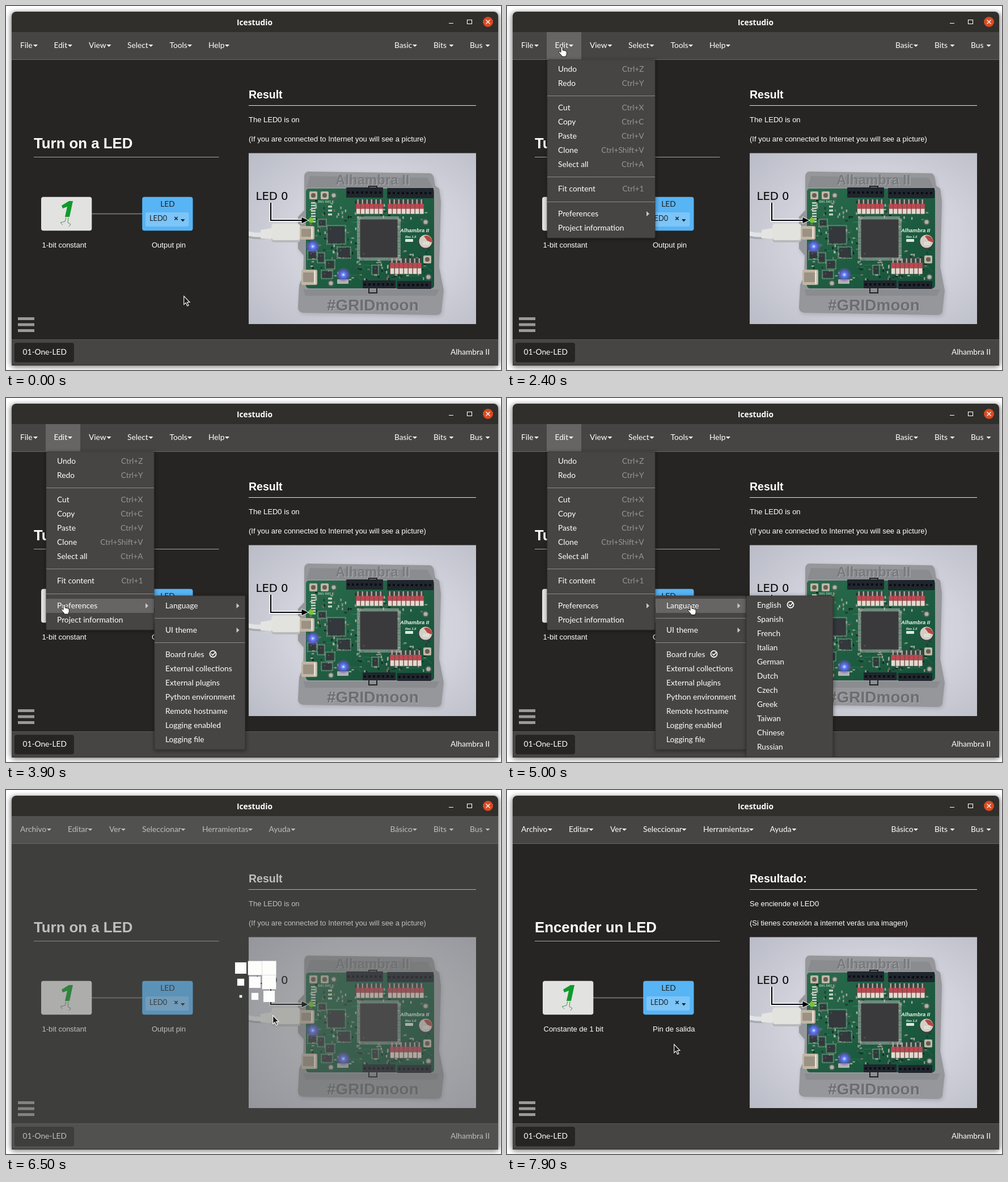
Animation, 873 px wide and 642 px high, one loop 8000 ms. Source, as an HTML page:

```html
<!DOCTYPE html>
<html lang="en">
<head>
<meta charset="utf-8">
<title>Icestudio language menu</title>
<style>
html, body { margin: 0; width: 100%; height: 100%; overflow: hidden; background: #fff; }
svg { display: block; width: 100%; height: 100%; }
text { white-space: pre; }
.ui { font: 13.75px Lato, sans-serif; fill: #fff; }
.doc { font: 13px "Liberation Sans", Arial, sans-serif; fill: #fff; }
.h1 { font-size: 25.8px; font-weight: bold; }
.h2 { font-size: 19.5px; font-weight: bold; }
.key { fill: #979593; }
</style>
</head>
<body>
<svg id="stage" viewBox="0 0 873 642" xmlns="http://www.w3.org/2000/svg">
  <defs>
    <radialGradient id="wall" cx=".55" cy=".5" r=".75">
      <stop offset="0" stop-color="#dadbe3"/><stop offset=".5" stop-color="#d1d2db"/>
      <stop offset="1" stop-color="#b9bbc6"/>
    </radialGradient>
    <linearGradient id="board" x1="0" y1="0" x2="1" y2="1">
      <stop offset="0" stop-color="#2a6b4c"/><stop offset="1" stop-color="#145038"/>
    </linearGradient>
    <linearGradient id="bar" x1="0" y1="0" x2="0" y2="1">
      <stop offset="0" stop-color="#302f2c"/><stop offset="1" stop-color="#282724"/>
    </linearGradient>
    <radialGradient id="glow">
      <stop offset="0" stop-color="#e8f4ff"/><stop offset=".25" stop-color="#5a86ff"/>
      <stop offset=".6" stop-color="#6a55d8" stop-opacity=".75"/><stop offset="1" stop-color="#6a55d8" stop-opacity="0"/>
    </radialGradient>
    <filter id="soft" x="-5%" y="-5%" width="110%" height="110%"><feGaussianBlur stdDeviation="5"/></filter>
    <filter id="shade" x="-10%" y="-10%" width="120%" height="120%"><feGaussianBlur stdDeviation="3"/></filter>
    <clipPath id="win"><rect x="10" y="46" width="858" height="587"/></clipPath>
    <clipPath id="photoBox"><rect x="428" y="259.5" width="401" height="301.5"/></clipPath>
  </defs>
</svg>
<script>
const svg = document.getElementById('stage');

function el(tag, attrs, parent = svg, txt) {
  const e = document.createElementNS('http://www.w3.org/2000/svg', tag);
  for (const k in attrs) e.setAttribute(k, attrs[k]);
  if (txt !== undefined) e.textContent = txt;
  parent.appendChild(e);
  return e;
}
const group = (parent = svg, attrs = {}) => el('g', attrs, parent);
const box = (g, x, y, w, h, fill, rx = 0, more = {}) => el('rect', { x, y, width: w, height: h, fill, rx, ...more }, g);
const disc = (g, cx, cy, r, fill, more = {}) => el('circle', { cx, cy, r, fill, ...more }, g);
const path = (g, d, more) => el('path', { d, fill: 'none', ...more }, g);
const label = (g, x, y, s, cls = 'ui', more = {}) => el('text', { x, y, class: cls, ...more }, g, s);
const show = (e, on) => e.setAttribute('visibility', on ? 'visible' : 'hidden');

// window
box(svg, 8, 11, 862, 626, '#000', 8, { opacity: .5, filter: 'url(#soft)' });
path(svg, 'M10 634V18a8 8 0 0 1 8-8H860a8 8 0 0 1 8 8V634z', { fill: 'url(#bar)' });
label(svg, 438.5, 33.5, 'Icestudio', '', {
  'text-anchor': 'middle', fill: '#fff', style: 'font:bold 13.8px "Open Sans","Noto Sans",sans-serif'
});
path(svg, 'M781 30.5H789M813.5 24.5H821.5V31.5H813.5z', { stroke: '#fff', 'stroke-width': 1.1 });
disc(svg, 850, 28, 9, '#dc4a20');
path(svg, 'M846.5 24.5L853.5 31.5M853.5 24.5L846.5 31.5', { stroke: '#fff', 'stroke-width': 1.4 });
box(svg, 10, 46, 858, 48, '#464543');
box(svg, 10, 94, 858, 1, '#676664');
box(svg, 10, 95, 858, 493, '#262523');
box(svg, 10, 588, 858, 1, '#5c5b59');
box(svg, 10, 589, 858, 44, '#464543');
box(svg, 15, 594, 105, 34.5, '#262523', 4);
label(svg, 29.5, 615, '01-One-LED');
label(svg, 853, 615, 'Alhambra II', 'ui', { 'text-anchor': 'end' });
for (const y of [549, 559.5, 570]) box(svg, 21, y, 29, 5, '#9b9a98');

// menu bar
const editTab = box(svg, 70, 46, 61, 48, '#666563');
function menuBar(items) {
  const g = group();
  for (const [x, s, c] of items) {
    label(g, x, 74, s);
    path(g, `M${c} 68h8l-4 4z`, { fill: '#fff' });
  }
  return g;
}
const shared = [[754, 'Bits', 781.5], [818, 'Bus', 845.5]];
const barEn = menuBar([[25, 'File', 48], [84.5, 'Edit', 109], [146, 'View', 177.5], [214, 'Select', 251.5],
  [288.5, 'Tools', 320], [357, 'Help', 386], [685, 'Basic', 717], ...shared]);
const barEs = menuBar([[25, 'Archivo', 72], [109, 'Editar', 144.5], [182, 'Ver', 203], [240, 'Seleccionar', 308.5],
  [346, 'Herramientas', 427], [463.5, 'Ayuda', 502.5], [677.5, 'Básico', 717], ...shared]);

// document
box(svg, 428, 175, 401, 1, '#e4e4e2');
box(svg, 49, 266, 326.5, 1, '#a5a4a2');
function docText(h1, h2, a, b, left, right, dx) {
  const g = group();
  label(g, 49, 251, h1, 'doc h1');
  label(g, 428, 163, h2, 'doc h2');
  label(g, 428, 204.5, a, 'doc');
  label(g, 428, 239, b, 'doc');
  label(g, 63.5 + dx, 426, left, 'doc');
  label(g, 257, 426, right, 'doc');
  return g;
}
const docEn = docText('Turn on a LED', 'Result', 'The LED0 is on',
  '(If you are connected to Internet you will see a picture)', '1-bit constant', 'Output pin', 0);
const docEs = docText('Encender un LED', 'Resultado:', 'Se enciende el LED0',
  '(Si tienes conexión a internet verás una imagen)', 'Constante de 1 bit', 'Pin de salida', 1);

box(svg, 150, 365.6, 92, 1.8, '#757472');
const constant = group();
box(constant, 62, 336.7, 89.3, 59.6, '#e2e2e0', 4);
path(constant, 'M98 352L111 344H118L112 372H104L108 354L100 357z', { fill: '#0f9a2c' });
path(constant, 'M106 373L104 380L96 382L100 386M110 373L109 382L114 385L111 389', { stroke: '#4c8f58', 'stroke-width': 1 });
box(svg, 240.2, 336.7, 89.3, 59.6, '#57b4f5', 4);
label(svg, 285, 354, 'LED', 'ui', { 'text-anchor': 'middle', style: 'fill:#222' });
box(svg, 246, 364, 76.5, 25, '#7cc5f9', 3);
label(svg, 253, 379, 'LED0', 'ui', { style: 'fill:#222;font-size:12.8px' });
path(svg, 'M297.3 372L302.7 377.4M302.7 372L297.3 377.4', { stroke: '#222', 'stroke-width': 1.5 });
path(svg, 'M308 376h7.5l-3.7 4.5z', { fill: '#222' });

// board picture
function picture() {
  let seed = 7;
  const rnd = () => (seed = seed * 16807 % 2147483647) / 2147483647;
  const g = group(svg, { 'clip-path': 'url(#photoBox)' });
  box(g, 428, 259, 401, 303, 'url(#wall)');
  const base = 'M534 292L748 295Q754 296 755 306L757 317L764 322L767 345L764 460L772 502L768 538Q767 545 758 545L524 541Q514 540 515 530L517 492L524 476L525 440L515 428V372L526 360V300Q527 292 534 292z';
  path(g, base, { fill: '#6c6e7a', opacity: .3, filter: 'url(#shade)', transform: 'translate(2 3)' });
  path(g, base, { fill: '#96979a' });
  path(g, 'M536 300L744 303L752 320H530zM524 500H764L758 511H528z', { fill: '#8b8c90' });
  const emboss = (x, y, s, size, dark) => {
    for (const [d, c] of [[1.2, '#a9aaad'], [0, dark]])
      label(g, x + d, y + d, s, '', { fill: c, style: `font:bold ${size}px "Liberation Sans",sans-serif` });
  };
  emboss(581, 315, 'Alhambra II', 24, '#7a7b7f');
  emboss(566, 537, '#GRIDmoon', 28, '#6c6d71');

  box(g, 529, 322, 226, 176, 'url(#board)', 5);
  for (let i = 0; i < 46; i++) {
    const x = 534 + rnd() * 205, y = 332 + rnd() * 145;
    path(g, `M${x} ${y}h${rnd() * 22}l${rnd() * 9} ${rnd() * 9}`, { stroke: '#2c7a57', 'stroke-width': .8 });
  }
  const tones = ['#16291f', '#8b9a88', '#77705a', '#1f3a2e', '#a2afa3'];
  for (let i = 0; i < 260; i++) {
    const x = 534 + rnd() * 210, y = 342 + rnd() * 140, flat = rnd() > .5;
    if (x > 690 && y > 386 && y < 425) continue;
    box(g, x, y, flat ? 4.5 : 2.4, flat ? 2.4 : 4.5, tones[i % 5]);
  }
  const header = (x, y, w, h) => {
    box(g, x, y, w, h, '#20262d', 1);
    for (let i = 2; i < w - 4; i += 8) box(g, x + i, y + h / 2 - 2, 4, 4, '#0b0e12');
  };
  header(600, 320, 65, 18); header(672, 321, 82, 18);
  header(629, 484, 58, 14); header(690, 485, 60, 14);
  path(g, 'M640 322v-4h14v4M640 498v8h14v-8', { stroke: '#222', 'stroke-width': 2 });
  const pins = (x, y, n, h) => {
    box(g, x - 1, y - 8, n * 8, 8, '#3c4540');
    box(g, x - 1, y, n * 8, h, '#7d4a49');
    for (let i = 0; i < n; i++) {
      const px = x + i * 8;
      box(g, px + 1.5, y - 8, 2.5, 8, '#a7a69f');
      box(g, px, y, 6.5, h * .45, '#c04750');
      box(g, px, y + h * .48, 6.5, h * .5, '#e2d9cf');
    }
  };
  pins(618, 349, 6, 18); pins(674, 349, 8, 18); pins(678, 453, 7, 20);

  const chip = (x, y, w, h, c = '#34373b') => {
    box(g, x - 2, y - 2, w + 4, h + 4, 'none', 0, { stroke: '#8b958c', 'stroke-width': 2, 'stroke-dasharray': '1.4 1.4' });
    box(g, x, y, w, h, c, 1.5);
    disc(g, x + 4, y + 4, 1, '#64666b');
  };
  box(g, 622, 374, 71, 72, 'none', 0, { stroke: '#a9aca6', 'stroke-width': 6, 'stroke-dasharray': '1.2 .9' });
  box(g, 624.5, 376.5, 66, 67, '#3a3a3d', 1);
  disc(g, 631, 437, 2, '#4b4b4e');
  chip(568, 389, 29, 29); chip(586, 427, 20, 16); chip(534, 433, 12, 12); chip(565, 450, 13, 12);
  chip(551, 437, 9, 14); chip(558, 468, 16, 11); chip(647, 459, 8, 13); chip(552, 378, 11, 9);

  const button = (x, y) => {
    box(g, x - 7, y - 7, 14, 14, '#bdb8aa', 2);
    disc(g, x, y, 4, '#695d4c');
  };
  button(542, 334); button(562, 334); button(743, 447);
  for (const [x, y] of [[578, 334], [740, 381], [745, 478], [573, 489]])
    disc(g, x, y, 4.5, '#aeb4a9', { stroke: '#596158', 'stroke-width': 2 });
  for (let i = 0; i < 8; i++) box(g, 538, 346 + i * 4.7, 8, 2.7, '#c9d2c4');
  for (let i = 0; i < 3; i++) box(g, 568, 352 + i * 7, 7, 3.5, '#c6d0c0');
  label(g, 550, 347, 'SW1 SW2', '', { fill: '#dfe8df', style: 'font:5px "Liberation Sans",sans-serif' });
  const boardText = (x, y, s, size) => label(g, x, y, s, '', { fill: '#edf4ea', style: `font:italic bold ${size}px "Liberation Sans",sans-serif` });
  boardText(695, 399, 'Alhambra II', 9.4);
  boardText(704, 409, 'Rev 1.0', 5.5);
  box(g, 704, 411, 14, 5, '#dce6dc', 1);
  disc(g, 740, 416, 13, '#37413f');
  disc(g, 740, 415, 11.5, '#d3cdc6');
  path(g, 'M737 406A10 10 0 0 1 751 417L743 414z', { fill: '#b5483f' });
  boardText(735, 421, '331', 7);

  // cable and sockets
  path(g, 'M426 403Q449 409 472 402', { stroke: '#a6a9b0', 'stroke-width': 11 });
  path(g, 'M426 401Q449 407 472 400', { stroke: '#e2e3e4', 'stroke-width': 8 });
  path(g, 'M449 395L472 391V411L449 410z', { fill: '#e4e4e2' });
  box(g, 468, 386, 51, 31, '#b9babc', 5);
  box(g, 468, 384, 51, 29, '#e2e2de', 5);
  const socket = (x, y, w, h) => {
    box(g, x, y, w, h, '#c0b6a5', 3);
    box(g, x + 3, y + 5, w - 9, h - 10, '#9c9283', 1);
    box(g, x + w - 6, y + 2, 3, h - 4, '#e5dfd3');
  };
  socket(518, 388, 26, 24); socket(521, 465, 28, 27);
  box(g, 584, 482, 20, 8, '#b3b2ab', 1);
  disc(g, 541, 424, 13, 'url(#glow)');
  disc(g, 595, 474, 13, 'url(#glow)');
  disc(g, 538, 378, 4.5, '#7cc334');

  label(g, 440.5, 341.5, 'LED 0', '', { fill: '#000', style: 'font:19.6px "DejaVu Sans",sans-serif' });
  const line = 'M467 347V378H525';
  path(g, line, { stroke: '#fff', 'stroke-width': 5 });
  path(g, 'M521 372L534 378L521 384z', { fill: '#000', stroke: '#fff', 'stroke-width': 1 });
  path(g, line, { stroke: '#000', 'stroke-width': 2.2 });
}
picture();

// drop-down menus: rows are [text, shortcut | '>' | tick x], null is a divider
const rows = [];
function dropDown(x, y, w, h, pad, first, items) {
  const g = group(svg, { 'clip-path': 'url(#win)' });
  box(g, x - 1, y, w + 3, h + 3, '#000', 2, { opacity: .35, filter: 'url(#shade)' });
  box(g, x, y, w, h, '#464543', 2, { stroke: '#3a3937', 'stroke-width': 1 });
  let cy = first;
  for (const it of items) {
    if (!it) {
      box(g, x, Math.floor(cy - 2.5), w, 1, '#8b8a88');
      cy += 18.3;
      continue;
    }
    const [s, extra] = it, base = Math.round(cy + 4.7);
    const back = box(g, x, base - 17, w, 25, '#666563');
    rows.push({ g, back, x, y: base - 17, w });
    label(g, x + pad, base, s);
    if (extra === '>') path(g, `M${x + w - 15} ${base - 9}l5 4.5l-5 4.5z`, { fill: '#c9c8c6' });
    else if (extra > 0) {
      disc(g, extra, base - 5.5, 5.6, 'none', { stroke: '#fff', 'stroke-width': 1.7 });
      path(g, `M${extra - 3} ${base - 6}l2.5 2.5l5 -5.5`, { stroke: '#fff', 'stroke-width': 1.7 });
    } else if (extra) label(g, x + w - 19.5, base, extra, 'ui key', { 'text-anchor': 'end' });
    cy += 25;
  }
  return g;
}
const editMenu = dropDown(71, 95, 190, 314, 19, 111, [['Undo', 'Ctrl+Z'], ['Redo', 'Ctrl+Y'], null,
  ['Cut', 'Ctrl+X'], ['Copy', 'Ctrl+C'], ['Paste', 'Ctrl+V'], ['Clone', 'Ctrl+Shift+V'], ['Select all', 'Ctrl+A'], null,
  ['Fit content', 'Ctrl+1'], null, ['Preferences', '>'], ['Project information']]);
const prefMenu = dropDown(262, 349, 159.5, 271, 19, 366, [['Language', '>'], null, ['UI theme', '>'], null,
  ['Board rules', 365], ['External collections'], ['External plugins'], ['Python environment'],
  ['Remote hostname'], ['Logging enabled'], ['Logging file']]);
const langMenu = dropDown(422, 349, 152.5, 300, 19, 365.5, [['English', 500],
  ...'Spanish French Italian German Dutch Czech Greek Taiwan Chinese Russian'.split(' ').map(s => [s])]);

// loading veil
const veil = box(svg, 10, 46, 858, 587, '#616160');
const loader = group();
const cubes = Array.from({ length: 9 }, (_, i) => {
  const col = i % 3, row = i / 3 | 0;
  return { e: box(loader, 0, 0, 0, 0, '#fdfdfc'), x: 414 + col * 25, y: 314 + row * 25, delay: (col + 2 - row) * 100 };
});
const ease = x => x * x * (3 - 2 * x);
function cubeScale(ms) {
  const p = ms < 0 ? 0 : ms / 1300 % 1;
  return p < .35 ? 1 - ease(p / .35) : p < .7 ? ease((p - .35) / .35) : 1;
}

// pointer
const arrow = path(svg, 'M.7 .7V15.6L4.1 12.4L6.6 18L9 17L6.6 11.5H11z', { fill: '#1a1a1a', stroke: '#fff', 'stroke-width': 1.1 });
const hand = path(svg, 'M4 2.2a1.6 1.6 0 0 1 3.2 0V7l4.9 1q2.2 .5 2.2 2.4v3q0 2-1.2 3.2v1.6H5.5v-1.5Q3 14 .6 11q-.7-1.4.5-1.9T4 10.6z',
  { fill: '#fff', stroke: '#111', 'stroke-width': 1 });
const track = [[0, 313, 511], [400, 313, 511], [600, 347, 496], [700, 347, 496], [900, 382, 390], [1000, 399, 319],
  [1100, 400, 261], [1200, 400, 261], [1600, 227, 149], [1700, 227, 149], [2100, 91, 71], [2900, 91, 71],
  [3300, 94, 318], [3400, 94, 318], [3700, 96, 344], [3800, 96, 344], [3900, 97, 363], [4600, 300, 362],
  [4900, 300, 362], [5800, 470, 383], [6000, 470, 383], [6500, 470, 397], [6600, 470, 397], [6700, 470, 403],
  [7100, 470, 403], [7900, 294, 448], [8000, 294, 448]];
function pointer(t) {
  const i = Math.max(1, track.findIndex(k => k[0] >= t));
  const [t0, x0, y0] = track[i - 1], [t1, x1, y1] = track[i];
  const p = (t - t0) / (t1 - t0);
  return [x0 + (x1 - x0) * p, y0 + (y1 - y0) * p];
}

function render(ms) {
  const t = Math.floor(ms / 100) * 100;
  const [x, y] = pointer(t), hx = x + 6, hy = y + 2;
  const between = (a, b) => t >= a && t < b;
  const open = between(2400, 6100);
  show(editTab, open);
  show(editMenu, open);
  show(prefMenu, between(3900, 6100));
  show(langMenu, between(5000, 6100));
  let over = between(2100, 3000);
  for (const r of rows) {
    const hit = r.g.getAttribute('visibility') === 'visible' &&
      hx >= r.x && hx < r.x + r.w && hy >= r.y && hy < r.y + 25;
    r.back.setAttribute('opacity', hit ? 1 : 0);
    over = over || hit;
  }
  const barSpanish = t >= 6200, docSpanish = t >= 6700;
  show(barEn, !barSpanish);
  show(barEs, barSpanish);
  show(docEn, !docSpanish);
  show(docEs, docSpanish);
  constant.setAttribute('transform', `translate(${docSpanish ? 1 : 0} 0)`);

  const busy = between(6200, 6700);
  show(veil, busy);
  show(loader, busy);
  veil.setAttribute('opacity', .41 * Math.min(1, Math.max(0, (t - 6100) / 400)));
  for (const c of cubes) {
    const s = 25 * cubeScale(t - 6170 - c.delay);
    const a = { x: c.x - s / 2, y: c.y - s / 2, width: s, height: s };
    for (const k in a) c.e.setAttribute(k, a[k]);
  }
  const at = `translate(${x.toFixed(1)} ${y.toFixed(1)})`;
  arrow.setAttribute('transform', at);
  hand.setAttribute('transform', at);
  show(arrow, !over);
  show(hand, over);
}

const start = performance.now();
function tick() {
  render((performance.now() - start) % 8000);
  requestAnimationFrame(tick);
}
tick();
</script>
</body>
</html>
```
